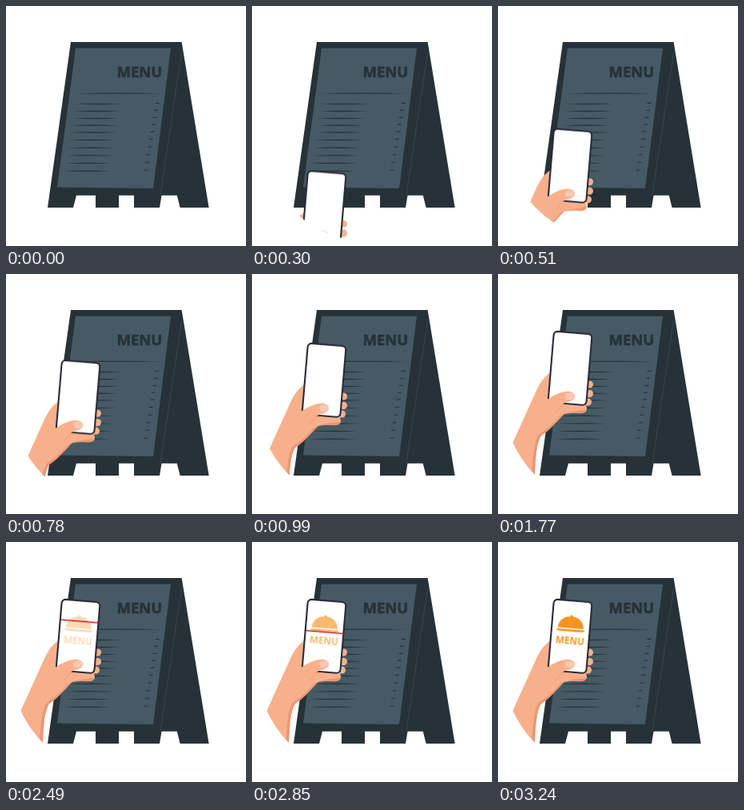
Recreate the animation shown at these times as an HTML page without scripts. Size 300 px wide and 300 px high, loop 3930 ms.

```html
<!DOCTYPE html>
<html lang="en">
<head>
<meta charset="utf-8">
<title>Menu scan</title>
<style>
  html, body { margin: 0; height: 100%; overflow: hidden; background: #fff; }
  svg { display: block; width: 100vw; height: 100vh; }
  text { font-family: "Open Sans", "Noto Sans", sans-serif; font-weight: 700; }

  .dark { fill: #263238; }
  .skin { fill: #f8b08c; }
  .shade { fill: #eb9674; }
  .orange { fill: #f7931e; }
  .title { stroke: #263238; stroke-width: .5; }

  .hand, .dish, .scan { animation: 3930ms linear infinite; }
  .hand { animation-name: rise; }
  .dish { animation-name: appear; }
  .scan { animation-name: sweep; }

  @keyframes rise {
    0% { transform: translateY(241px); animation-timing-function: cubic-bezier(.333, .833, .667, 1); }
    36.4%, 100% { transform: none; }
  }
  @keyframes appear {
    0%, 53.4% { opacity: 0; }
    82.4%, 100% { opacity: 1; }
  }
  @keyframes sweep {
    0%, 53.39% { transform: translateY(-33px); visibility: hidden; }
    53.4% { transform: translateY(-33px); visibility: visible; }
    82.3% { transform: translateY(10px); visibility: visible; }
    82.4%, 100% { transform: translateY(10px); visibility: hidden; }
  }
</style>
</head>
<body>
<svg viewBox="0 0 300 300">
  <defs>
    <clipPath id="stage"><circle cx="150" cy="150" r="145"/></clipPath>
    <g id="row" class="dark">
      <path d="M0 0Q29 -1.4 58.5 0Q29 1.4 0 0Z"/>
      <path d="M99.5 -1Q103 -2.2 106.5 -1.2Q103 .2 99.5 -1Z"/>
    </g>
  </defs>

  <g id="board">
    <path class="dark" d="M81 45H219.6L253.6 252H217.6L213.7 236.7H194.5L192 252H160V236.7H141V252H112V236.7H88L84 252H52Z"/>
    <path d="M87 52.700H206L184 228L64 226.500Z" fill="#455a64"/>
    <path d="M219.500 58L193 236" stroke="#42535c" stroke-width=".6"/>
    <text class="dark title" x="138.500" y="88.800" font-size="18.500">MENU</text>
    <path class="dark" d="M86 109.200Q139 107.900 193 109.200Q139 110.500 86 109.200Z"/>
    <g transform="translate(86 122.500) skewX(-9.600)">
      <use href="#row"/>
      <use href="#row" y="9"/>
      <use href="#row" y="18"/>
      <use href="#row" y="26.700"/>
      <use href="#row" y="35.500"/>
      <use href="#row" y="45"/>
      <use href="#row" y="54.700"/>
      <use href="#row" y="64.400"/>
      <use href="#row" y="74"/>
      <use href="#row" y="83.700"/>
    </g>
  </g>

  <g clip-path="url(#stage)">
    <g class="hand">
      <!-- Arm, palm and fingertips behind the phone -->
      <path class="skin" d="M66 123C56 129 51 139 46.500 149L17.500 213L-6 262L44 287L46 251C47 228 48 211 54 202C65 195 72 186 82 175L92 150Z"/>
      <path class="shade" d="M82 174C73 181 67 191 53 199C45 204 44 228 42 250L41 287H45L46 251C47 228 48 211 54 202C65 195 72 186 84 174Z"/>
      <g class="skin">
        <rect x="104" y="133.500" width="15" height="9" rx="4.500"/>
        <rect x="104" y="145" width="15" height="9" rx="4.500"/>
        <rect x="102" y="155.500" width="15" height="9" rx="4.500"/>
      </g>
      <path class="skin" d="M70 158L108 163C112.500 166 112 172.500 107 173.500C97 174.500 88 173 80 176L64 188Z"/>
      <path class="shade" d="M111 169.500C110 173.500 106 174.500 100 174.200C92 173.500 86 173.500 80 176L75 181C79 172.500 91 172.500 111 169.500Z"/>

      <g transform="translate(90 117.600) rotate(4.800)">
        <rect x="-23.800" y="-44.300" width="47.800" height="89" rx="5" fill="#fff" stroke="#2b2c38" stroke-width="2.100"/>
        <g class="dish orange">
          <path d="M-16 -10C-16 -19 -9 -24 -2 -24.300A2 2 0 1 1 2 -24.300C9 -24 16 -19 16 -10Z"/>
          <path d="M-18 -8.500H18Q17 -5.800 14 -5.800H-14Q-17 -5.800 -18 -8.500Z"/>
          <text x=".4" y="9.700" font-size="11.700" text-anchor="middle">MENU</text>
        </g>
        <path class="scan" d="M-23 -.500H26" stroke="#c4161c" stroke-width="1.400"/>
      </g>

      <!-- Thumb in front -->
      <path class="skin" d="M58 159C65 155 73 148.500 84 147C91 146 96 148.500 96 153C96 157.500 91 159.500 84 160.500C80 162.500 78 167 74 171L58 182Z"/>
      <path d="M85 149.500C91 147.500 96 149 96 153C95.500 157 91 158 86.500 157Q82.500 153 85 149.500Z" fill="#fbc8b0"/>
      <path d="M84 160.500C79 162.500 78 168 72 173" fill="none" stroke="#eb9674" stroke-width=".8"/>
    </g>
  </g>
</svg>
</body>
</html>
```
